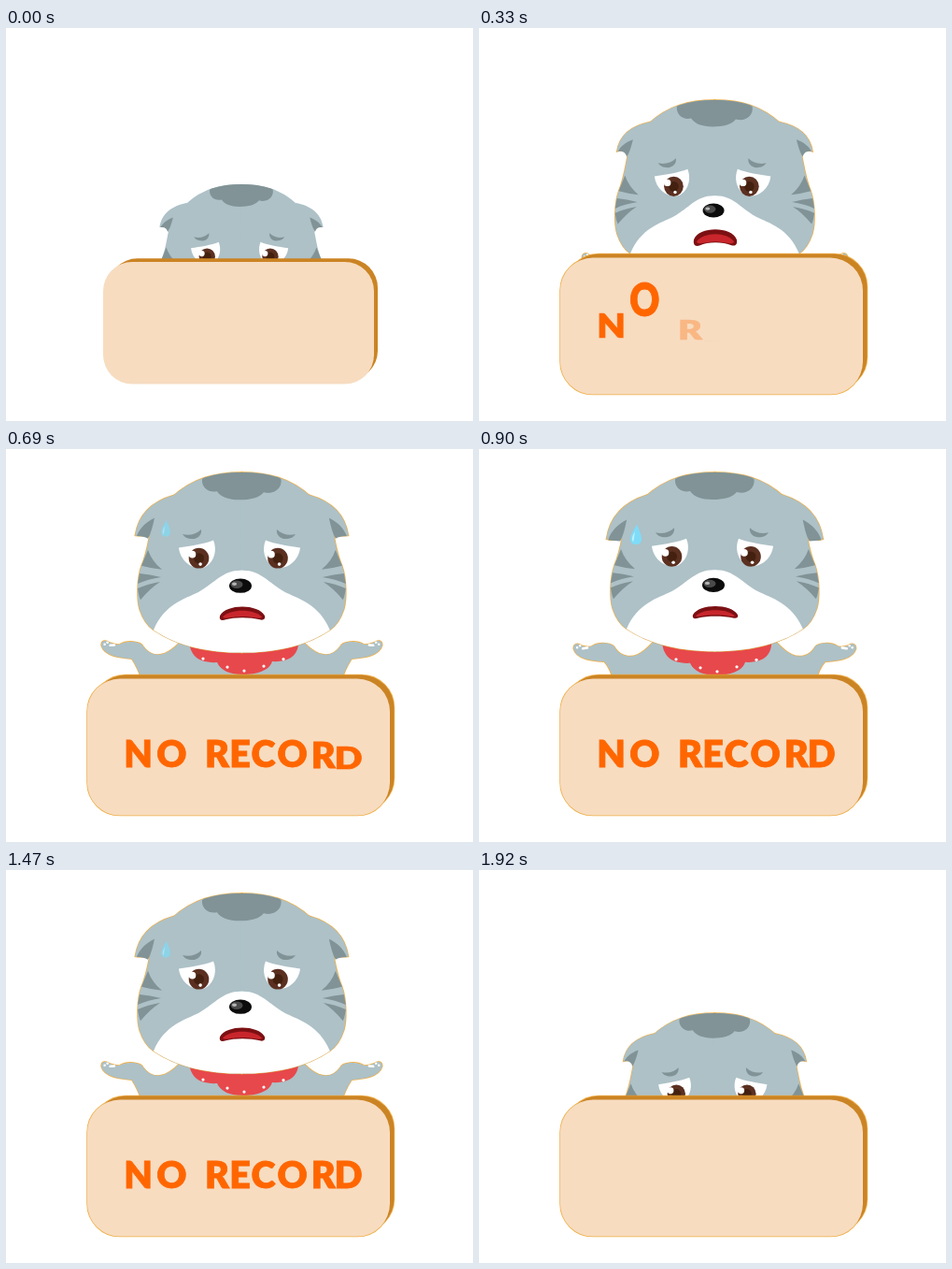
An HTML page for the animation above (1950 ms loop, 500 by 420 pixels).

```html
<!DOCTYPE html>
<html lang="en">
<head>
<meta charset="utf-8">
<title>No record</title>
<style>
  html, body { margin: 0; width: 100%; height: 100%; overflow: hidden; background: #fff; }
  svg { display: block; width: 500px; height: 420px; }
  text { font: 900 39.5px Lato, "Open Sans", sans-serif; fill: #ff6600; stroke: #ff6600; stroke-width: .8; text-anchor: middle; }
  .fur { fill: #adc1c7; }
  .dark { fill: #819396; }
  .edge { fill: none; stroke: #eda32c; stroke-width: 1.5; opacity: .85; }
  .toes { fill: none; stroke: #fff; stroke-width: 2.6; stroke-linecap: round; }
</style>
</head>
<body>
<svg viewBox="0 0 500 420">
  <defs>
    <path id="headHalf" d="M253 25H252C224 25 200 31 178 51L157 77C153 92 152 108 145 124C140 138 140 160 143 170C147 182 152 188 158 192C185 210 220 216 252 216H253Z"/>
    <path id="muzzleHalf" d="M253 129H251C232 129 224 142 206 152C192 159 170 164 158 192C185 210 220 216 252 216H253Z"/>
    <path id="ear"/>
    <path id="earInner"/>
    <path id="arm"/>
    <path id="toes"/>
    <path id="stripes" d="M152 107Q156 119 167 128Q156 127 145 124ZM143 132Q154 133 166 136Q152 138 141 143ZM141 148Q152 143 165 141Q154 148 144 160Q142 156 141 148Z"/>
    <path id="brow" d="M189 89C196 91 204 89 209 84C210 90 205 94 200 94C194 94 191 92 189 89Z"/>
    <path id="eyeWhite" d="M185 103.500C198 101.500 212 99.500 222 95.500C226 104.500 224 117.500 214 123.500C204 128.500 187 120.500 185 103.500Z"/>
    <g id="iris">
      <circle r="10.8" fill="#5b3021"/>
      <circle r="5.5" fill="#43200f"/>
      <circle cx="-7" cy="-4" r="3.8" fill="#fff"/>
      <circle cx="1.600" cy="6.300" r="1.800" fill="#fff"/>
    </g>
    <rect id="back" x="93" y="241.6" width="322.5" height="145" rx="35"/>
    <rect id="front" x="87" y="245.6" width="324" height="146" rx="35"/>
  </defs>
  <g id="scene">
    <g id="body">
      <g class="edge" data-pair="arm"></g>
      <g class="fur" data-pair="arm"></g>
      <g class="toes" data-pair="toes"></g>
      <g id="scarf">
        <path fill="#e7484c" d="M196 200H313C315 218 308 229 285 228C282 238 268 242 254 242C240 242 230 238 226 229C204 230 195 220 196 200Z"/>
        <g fill="#fff">
          <circle cx="211" cy="225" r="1.6"/><circle cx="237" cy="234" r="1.6"/>
          <circle cx="255" cy="238" r="1.6"/><circle cx="276" cy="233" r="1.6"/>
          <circle cx="297" cy="225.5" r="1.6"/>
        </g>
      </g>
    </g>
    <g id="head">
      <g class="edge" data-pair="headHalf ear"></g>
      <g class="fur" data-pair="ear headHalf"></g>
      <g class="dark" data-pair="earInner stripes"></g>
      <path class="dark" d="M210 32L212.7 30.5C225 26.500 238 25 252 25C267 25 280 26.500 292 30.5L294.500 32C296 42 287 49 276 46C271 52 262 54 250 54C238 54 230 51 226 45C218 47 209 42 210 32Z"/>
      <g fill="#fff" data-pair="muzzleHalf"></g>
      <g id="gaze">
        <g class="dark" data-pair="brow" data-axis="249.5"></g>
        <g fill="#fff" data-pair="eyeWhite" data-axis="250"></g>
        <use href="#iris" x="206.5" y="114.5"/>
        <use href="#iris" x="291" y="114.5"/>
      </g>
      <ellipse cx="251" cy="145.2" rx="12" ry="7.6" fill="#0c0c0c"/>
      <ellipse cx="247" cy="143.700" rx="6.5" ry="4.2" fill="#4a4a4a"/>
      <ellipse cx="244.5" cy="143.2" rx="2.6" ry="1.7" fill="#b5b5b5"/>
      <path id="mouth" fill="#7c1013"/>
      <path id="tongue" fill="#c8262c"/>
      <g id="tear">
        <path fill="#7edcf8" d="M1 -11C3 -5 6 0 6 5C6 12.500 -6 12.500 -6 5C-6 0 -2 -5 1 -11Z"/>
        <path fill="#c3f0fc" d="M-1 -3C-4 1 -5 5 -3 8C-2 5 -2 1 -1 -3Z"/>
      </g>
    </g>
    <g class="edge"><use href="#back"/><use href="#front"/></g>
    <use href="#back" fill="#cb8424"/>
    <use href="#front" fill="#f7dcc0"/>
    <g id="letters"></g>
  </g>
</svg>
<script>
const LOOP = 1950, STEP = 30, BOB = 780;
const $ = id => document.getElementById(id);
const NS = "http://www.w3.org/2000/svg";

function add(parent, tag, attrs) {
  const el = parent.appendChild(document.createElementNS(NS, tag));
  for (const name in attrs) el.setAttribute(name, attrs[name]);
  return el;
}

// Place each half shape together with its mirror image.
document.querySelectorAll("[data-pair]").forEach(g => {
  const axis = g.dataset.axis || 252.4;
  for (const id of g.dataset.pair.split(" ")) {
    add(g, "use", { href: "#" + id });
    add(g, "use", { href: "#" + id, transform: `translate(${2 * axis} 0) scale(-1 1)` });
  }
});

const centers = [141.5, 177.3, 226, 250.5, 275.5, 306.5, 339.8, 366.5];
const letters = [..."NORECORD"].map(char => {
  const el = add($("letters"), "text", {});
  el.textContent = char;
  return el;
});

const clamp = (x, lo = 0, hi = 1) => Math.min(hi, Math.max(lo, x));
const lerp = (a, b, k) => a + (b - a) * k;
const smooth = x => (x = clamp(x)) * x * (3 - 2 * x);

// Paths for the lifted and the drooping pose.
const poses = {
  ear: ["M180 49C160 53 146 62 143 81C150 79 158 80 160 79L172 72Z",
        "M180 49C158 56 140 70 136 97C142 99 148 99 154 95L172 72Z"],
  earInner: ["M161 68C152 71 147 76 144 81C149 80 153 82 154 87C157 82 159 76 161 68Z",
             "M158 76C150 80 141 88 138 98C143 99 147 99 151 99C154 94 156 86 158 76Z"],
  arm: ["M104 201C104 196 109 195 112 198C116 200 120 203 124 204C132 200 146 202 149 205C154 213 161 217 170 215C180 212 184 208 190 203L253 203V250H152C146 240 140 228 136 216C122 215 108 212 104 201Z",
        "M101 214C101 208 106 208 110 211C114 212 118 213 121 211C128 206 144 207 146 214C152 222 161 224 170 220C180 215 184 208 190 203L253 203V250H144C142 240 140 234 134 228C122 227 104 226 101 214Z"],
  toes: ["M107 200L107 200M110 198L110 198M113 201L116 202",
         "M105 213L105 213M108 211L108 211M111 214L116 213"],
  mouth: ["M229 177C234 162 272 162 277 177C278 183 275 184 271 183C262 179 244 179 236 183C231 185 228 183 229 177Z",
          "M229 177C236 165 270 165 277 177C278 180 275 181 272 180C262 178 244 178 235 180C230 182 228 180 229 177Z"],
  tongue: ["M232 179C240 168 266 168 274 179C272 183 268 180 253 179C238 180 234 183 232 179Z",
           "M232 178C240 170 266 170 274 178C272 180 268 177 253 177C238 177 234 180 232 178Z"]
};

function mixPath([a, b], k) {
  const ends = b.match(/[\d.]+/g);
  let i = 0;
  return a.replace(/[\d.]+/g, n => lerp(+n, +ends[i++], k).toFixed(2));
}

// Rows: [position, values...], linear in between.
function sample(rows, x) {
  x = clamp(x, rows[0][0], rows[rows.length - 1][0]);
  const i = Math.max(1, rows.findIndex(row => row[0] >= x));
  const a = rows[i - 1], b = rows[i], k = (x - a[0]) / (b[0] - a[0]);
  return a.slice(1).map((v, j) => lerp(v, b[j + 1], k));
}

const pop = [[0, .895], [30, .95], [60, 1], [90, 1.024], [120, 1.032], [150, 1.022], [180, 1.008], [210, 1]];
// Letter hop: baseline, height, opacity.
const hop = [[0, 335, 0, 0], [1.5, 335, 20, .25], [2, 326, 26, .55], [3, 306.5, 37, 1], [4, 319, 33, 1],
             [4.6, 330.5, 27, 1], [5, 332, 28, 1], [6, 342, 23, 1], [7, 342, 26, 1], [8, 340, 29, 1]];

function drawLetter(el, i, t) {
  const enter = (t - 192) / 30 - 1.5 * i;
  const leave = 9 - i - (t - 1680) / 22;
  const [base, height, alpha] = sample(hop, Math.min(enter, leave));
  el.setAttribute("transform", `translate(${centers[i]} ${base}) scale(1 ${height / 29})`);
  el.setAttribute("opacity", alpha);
}

function draw(t) {
  const rise = Math.min(smooth((t - 178) / 270), 1 - smooth((t - 1655) / 265));
  const phase = t < 450 ? 0 : (t - 450) / BOB % 1;
  const droop = (1 - Math.cos(2 * Math.PI * phase)) / 2 * rise;
  const lift = 1 - droop;
  const size = lerp(.895, 1, rise);

  $("scene").setAttribute("transform", `translate(249 287) scale(${sample(pop, t)[0]}) translate(-249 -287)`);
  $("head").setAttribute("transform",
    `translate(252.4 ${25 + 128 * (1 - rise)}) scale(${size} ${size * (1 + .026 * lift)}) translate(-252.4 -25)`);
  $("body").setAttribute("transform",
    `translate(252.4 ${241 + 105 * (1 - rise)}) scale(${size}) translate(-252.4 -241)`);
  $("scarf").setAttribute("transform", `translate(0 ${-2.8 * lift})`);
  $("gaze").setAttribute("transform", `translate(0 ${4.5 * lift})`);
  for (const id in poses) $(id).setAttribute("d", mixPath(poses[id], droop));

  const slide = phase - .31;
  $("tear").setAttribute("transform",
    `translate(${171 - 11 * slide} ${84.5 + 26 * slide}) scale(${lerp(.7, 1, clamp((phase - .22) / .22))})`);
  $("tear").setAttribute("opacity", Math.min(clamp((phase - .2) / .16), clamp((.82 - phase) / .12)));

  document.querySelectorAll(".edge").forEach(el => el.style.display = t < STEP ? "none" : "");
  letters.forEach((el, i) => drawLetter(el, i, t));
}

let start;
function tick(now) {
  start ??= now;
  draw(Math.floor((now - start) % LOOP / STEP) * STEP);
  requestAnimationFrame(tick);
}
draw(0);
requestAnimationFrame(tick);
</script>
</body>
</html>
```
